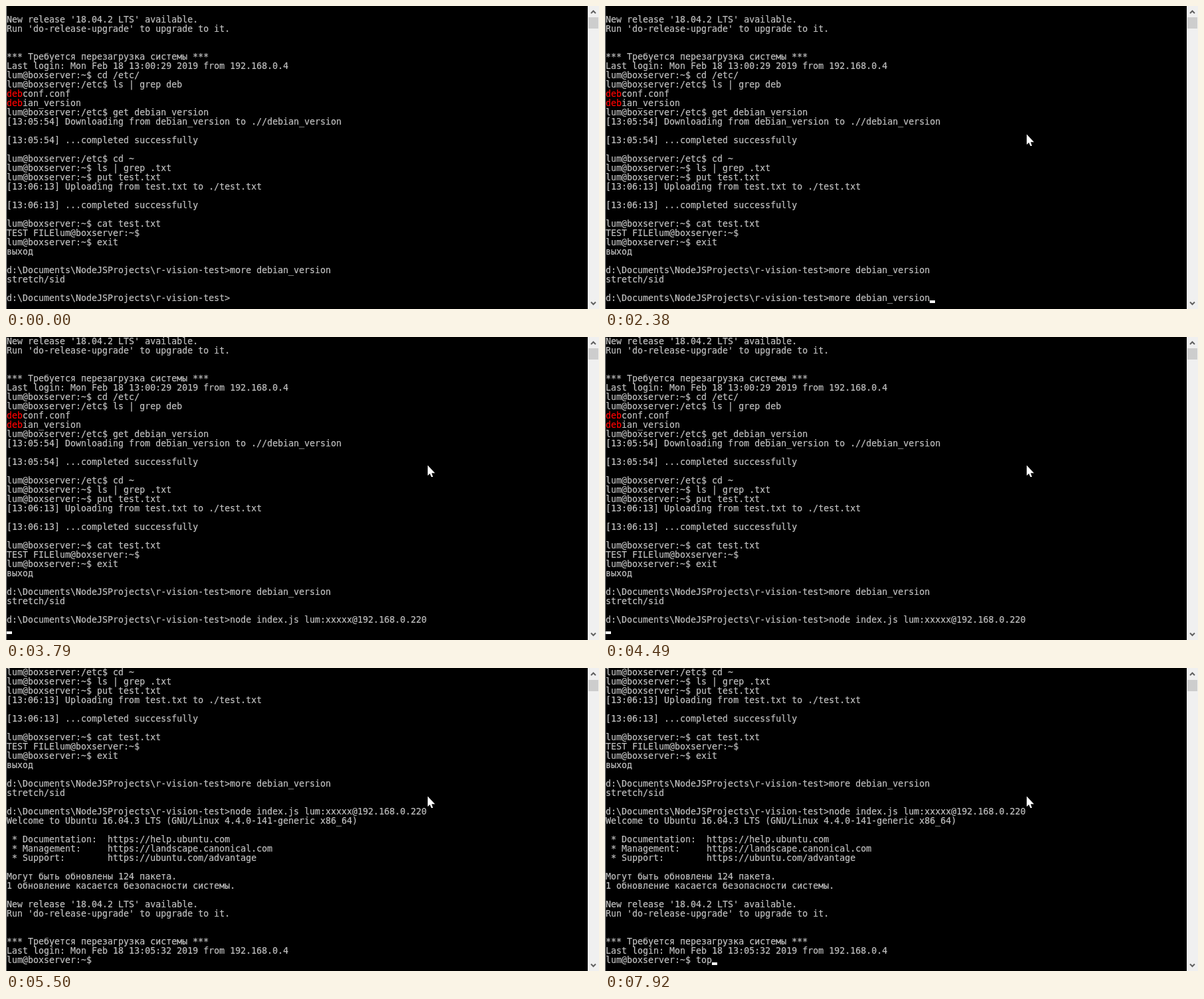
An HTML page for the animation above (8000 ms loop, 893 by 457 pixels).

```html
<!DOCTYPE html>
<html lang="ru">
<head>
<meta charset="utf-8">
<title>Terminal session</title>
<style>
  html, body { margin: 0; width: 100%; height: 100%; overflow: hidden; background: #000; }
  pre {
    position: absolute; left: 1px; top: 0; margin: 0;
    font: 13.3px/14px "DejaVu Sans Mono", "Liberation Mono", monospace;
    color: #c0c0c0; -webkit-text-stroke: .2px;
  }
  pre b { font-weight: normal; color: #f00; }
  svg { position: absolute; left: 0; top: 0; }
</style>
</head>
<body>
<pre id="text"></pre>
<svg width="893" height="457">
  <rect id="edge" width="1" height="457"/>
  <rect x="876" width="17" height="457" fill="#f0f0f0"/>
  <rect id="thumb" x="877" y="17" width="15" height="17" fill="#cdcdcd"/>
  <path d="M881 11l3.5-3.5 3.5 3.5M881 446.5l3.5 3.5 3.5-3.5" fill="none" stroke="#606060" stroke-width="2"/>
  <rect id="caret" y="444" width="8" height="4" fill="#fff"/>
  <path id="mouse" d="M0 -.5V15L3.3 12 5.5 17H8L6 11.3H11Z" fill="#fff"/>
</svg>
<script>
const LOOP = 8000, ROWS = 32, CELL = 8;
const $ = id => document.getElementById(id);
const host = "lum@boxserver:";
const home = host + "~$ ", etc = host + "/etc$ ";
const folder = "d:\\Documents\\NodeJSProjects\\r-vision-test>";
const more = "more debian_version";
const connect = "node index.js lum:xxxxx@192.168.0.220";

const notice = time => `
New release '18.04.2 LTS' available.
Run 'do-release-upgrade' to upgrade to it.


*** Требуется перезагрузка системы ***
Last login: Mon Feb 18 ${time} 2019 from 192.168.0.4`;

const history = `${notice("13:00:29")}
${home}cd /etc/
${etc}ls | grep deb
<b>deb</b>conf.conf
<b>deb</b>ian_version
${etc}get debian_version
[13:05:54] Downloading from debian_version to .//debian_version

[13:05:54] ...completed successfully

${etc}cd ~
${home}ls | grep .txt
${home}put test.txt
[13:06:13] Uploading from test.txt to ./test.txt

[13:06:13] ...completed successfully

${home}cat test.txt
TEST FILE${home}
${home}exit
выход

${folder}${more}
stretch/sid

${folder}`;

const welcome = `
Welcome to Ubuntu 16.04.3 LTS (GNU/Linux 4.4.0-141-generic x86_64)

 * Documentation:  https://help.ubuntu.com
 * Management:     https://landscape.canonical.com
 * Support:        https://ubuntu.com/advantage

Могут быть обновлены 124 пакета.
1 обновление касается безопасности системы.
${notice("13:05:32")}
`;

const recalled = history + more;
const ready = history + connect;
const sent = ready + "\n";
const greeted = ready + welcome;
const shell = greeted + home;

// [start, console content, caret visible]
const screens = [
  [0, history, 0], [1300, history, 1],
  [1620, recalled, 1], [1850, recalled, 0], [2380, recalled, 1],
  [2850, ready, 0], [2930, ready, 1], [3390, ready, 0],
  [3790, sent, 1], [3940, sent, 0], [4490, sent, 1],
  [4560, greeted, 1],
  [4640, shell, 1], [5500, shell, 0], [6030, shell, 1], [6580, shell, 0], [7130, shell, 1],
  [7660, shell + "t", 1], [7750, shell + "to", 1], [7920, shell + "top", 1]
];

// [start, x, y]
const pointer = [
  [0, -50, -50], [210, 682, 404], [290, 623, 290], [370, 565, 177],
  [1070, 634, 193], [1140, 635, 194]
];

const current = (steps, t) => steps.findLast(step => step[0] <= t);
let shown;

function draw(now) {
  const t = now % LOOP;
  const [, content, caretOn] = current(screens, t);
  const [, x, y] = current(pointer, t);
  const lines = content.split("\n").slice(-ROWS);
  // the empty span keeps a leading blank line
  if (content !== shown) $("text").innerHTML = "<span></span>" + lines.join("\n");
  shown = content;
  $("caret").setAttribute("x", 1 + CELL * lines.at(-1).length);
  $("caret").setAttribute("opacity", caretOn);
  $("mouse").setAttribute("transform", `translate(${x} ${y})`);
  $("thumb").setAttribute("y", t < 4560 ? 17 : 18);
  $("edge").setAttribute("fill", t < 750 ? "#aaa" : "#888");
  requestAnimationFrame(draw);
}
draw(performance.now());
</script>
</body>
</html>
```
